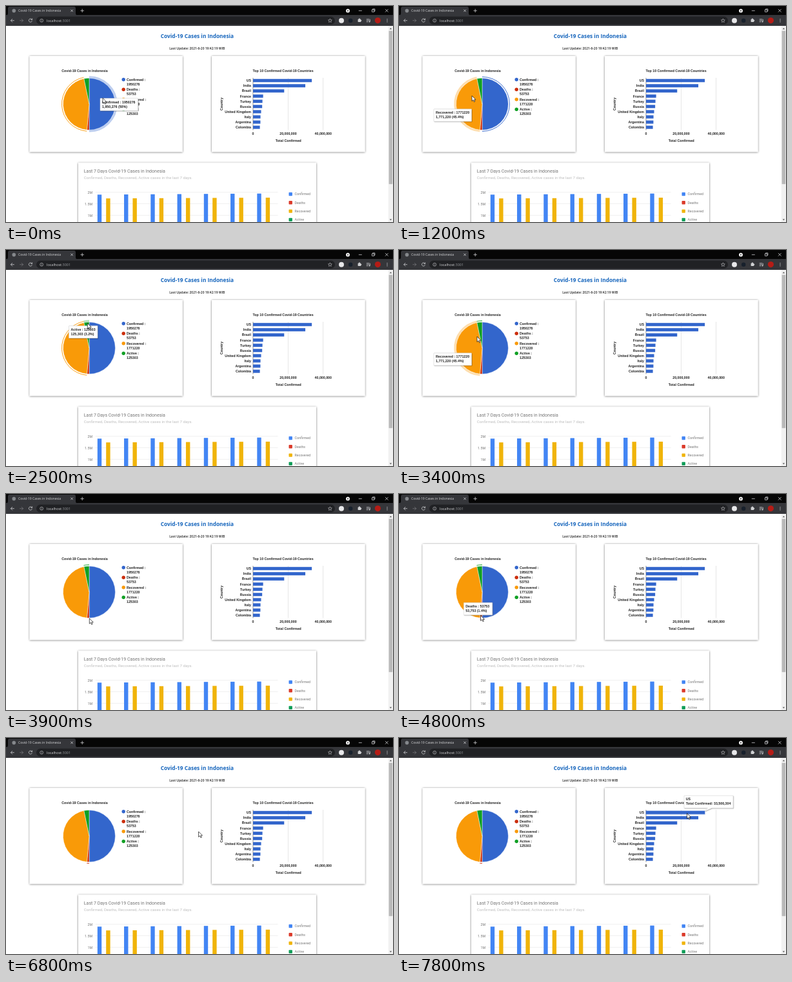
Write an HTML page that moves like this. It is 600 px wide and 337 px high and loops after 8 s.

```html
<!DOCTYPE html>
<html lang="en">
<head>
<meta charset="utf-8">
<title>Covid-19 Cases in Indonesia</title>
<style>
html, body { margin: 0; width: 100%; height: 100%; overflow: hidden; background: #fff; }
svg { display: block; width: 100%; height: 100%; }
text { white-space: pre; }
.chart { font: bold 5.27px "Liberation Sans", Arial, sans-serif; fill: #222; }
.mat { font: 5.27px Roboto, sans-serif; fill: #757575; }
.ui { font: 5.1px "Open Sans", sans-serif; fill: #d6d7d9; }
.end { text-anchor: end; }
.mid { text-anchor: middle; }
.line { fill: none; stroke: #d0d1d3; stroke-width: .8; }
</style>
</head>
<body>
<svg id="stage" viewBox="0 0 600 337">
  <defs>
    <filter id="lift" x="-10%" y="-10%" width="120%" height="120%">
      <feDropShadow dx="0" dy=".5" stdDeviation="1.5" flood-color="#000" flood-opacity=".6"/>
    </filter>
    <filter id="tipLift" x="-10%" y="-20%" width="120%" height="150%">
      <feDropShadow dx=".7" dy=".7" stdDeviation=".7" flood-color="#000" flood-opacity=".4"/>
    </filter>
  </defs>
  <rect width="600" height="337" fill="#fff"/>
  <g id="page"></g>
  <g id="browser"></g>
  <g id="rings"></g>
  <g id="tip"></g>
  <path id="cursor" d="M0 0V8.4L2 6.6L3.4 9.6L4.8 9L3.4 6.1H6Z" fill="#fff" stroke="#111" stroke-width=".7" stroke-linejoin="round"/>
</svg>
<script>
const $ = id => document.getElementById(id);
const LOOP = 8000, STEP = 100;
const PIE = { x: 129, y: 153, r: 40.5 };

const slices = [
  { name: 'Confirmed', n: 1950276, pct: '50%', color: '#3366cc', tip: [146, 144] },
  { name: 'Deaths', n: 53753, pct: '1.4%', color: '#cc2e0a', tip: [100.3, 169.5] },
  { name: 'Recovered', n: 1771220, pct: '45.4%', color: '#f99a08', tip: [54, 160.7] },
  { name: 'Active', n: 125303, pct: '3.2%', color: '#10a024', tip: [97.5, 118.2] }
];
const total = slices.reduce((sum, s) => sum + s.n, 0);
let turn = 0;
for (const s of slices) {
  s.from = turn;
  turn += s.n / total * 2 * Math.PI;
  s.to = turn;
}

const text = (x, y, str, cls = 'chart', extra = '') =>
  `<text x="${x}" y="${y}" class="${cls}" ${extra}>${str}</text>`;
const rect = (x, y, w, h, fill, extra = '') =>
  `<rect x="${x}" y="${y}" width="${w}" height="${h}" fill="${fill}" ${extra}/>`;
const dot = (x, y, r, fill, extra = '') =>
  `<circle cx="${x}" cy="${y}" r="${r}" fill="${fill}" ${extra}/>`;
const line = (d, extra = '') => `<path d="${d}" class="line" ${extra}/>`;
const card = (x, y, w, h) => rect(x, y, w, h, '#fff', 'filter="url(#lift)"');

const point = (a, r) =>
  `${(PIE.x + r * Math.sin(a)).toFixed(2)} ${(PIE.y - r * Math.cos(a)).toFixed(2)}`;
const arc = (s, r) =>
  `${point(s.from, r)}A${r} ${r} 0 ${s.to - s.from > Math.PI ? 1 : 0} 1 ${point(s.to, r)}`;
const ring = (s, r, width, alpha) =>
  `<path d="M${arc(s, r)}" fill="none" stroke="${s.color}" stroke-width="${width}" opacity="${alpha}"/>`;

function drawPie() {
  let out = card(36.7, 78, 237, 149.5) + text(86.3, 102.9, 'Covid-19 Cases in Indonesia');
  slices.forEach((s, i) => {
    const y = 116.6 + i * 15.5;
    out += `<path d="M${PIE.x} ${PIE.y}L${arc(s, PIE.r)}Z" fill="${s.color}" stroke="#fff" stroke-width=".45"/>`
      + dot(182.2, y - 1.8, 2.7, s.color)
      + text(187, y, s.name + ' :') + text(187, y + 7, s.n);
  });
  return out;
}

function drawCountries() {
  const rows = [['US', 33.5], ['India', 29.8], ['Brazil', 17.75], ['France', 5.75], ['Turkey', 5.36],
    ['Russia', 5.2], ['United Kingdom', 4.6], ['Italy', 4.25], ['Argentina', 4.2], ['Colombia', 3.9]];
  const perM = 2.72, x0 = 383;
  let out = card(319, 78, 237.5, 149.5) + text(382.5, 102.9, 'Top 10 Confirmed Covid-19 Countries');
  ['0', '20,000,000', '40,000,000'].forEach((label, i) => {
    const x = x0 + i * 20 * perM;
    out += rect(x - .25, 112, .5, 81.5, i ? '#ccc' : '#333') + text(x, 201.3, label, 'chart mid');
  });
  rows.forEach(([name, m], i) => {
    const y = 116.3 + i * 8.1;
    out += rect(x0, y - 2.5, m * perM, 5, '#3366cc') + text(380, y + 1.9, name, 'chart end');
  });
  return out + text(437.8, 212, 'Total Confirmed', 'chart mid', 'font-style="italic"')
    + text(0, 0, 'Country', 'chart mid', 'font-style="italic" transform="translate(335.6 153) rotate(-90)"');
}

function drawWeek() {
  let out = card(112, 244.7, 369, 110)
    + text(120.8, 260.2, 'Last 7 Days Covid-19 Cases in Indonesia', 'mat', 'style="font-size:7.03px"')
    + text(120.8, 269.6, 'Confirmed, Deaths, Recovered, Active cases in the last 7 days.', 'mat',
      'style="font-size:6.15px;fill:#bdbdbd"');
  ['2M', '1.5M', '1M'].forEach((label, i) => {
    const y = 290.6 + i * 18.1;
    out += rect(138.5, y - .25, 283, .5, '#e0e0e0') + text(134, y + 1.9, label, 'mat end');
  });
  for (let i = 0; i < 7; i++) {
    const x = 141.8 + i * 41.25;
    out += rect(x, 294.3 - i * .28, 6.4, 50, '#4285f4') + rect(x + 13.4, 300.2 - i * .2, 6.4, 50, '#f0b40a');
  }
  const colors = ['#4285f4', '#db3a2a', '#f0b40a', '#0f9d58'];
  slices.forEach((s, i) => {
    const y = 293.5 + i * 13.3;
    out += rect(438.5, y - 2.7, 5.4, 5.4, colors[i], 'rx=".8"') + text(447.6, y + 1.9, s.name, 'mat');
  });
  return out;
}

function drawBrowser() {
  const bar = '#35363a';
  let out = rect(0, 0, 600, 14.5, '#060606') + rect(0, 14, 600, 17, bar)
    + `<path d="M0 14.5Q3 14.5 3 11V3.5Q3 1 5.5 1H105.5Q108 1 108 3.5V11Q108 14.5 111 14.5Z" fill="${bar}"/>`
    + dot(12.3, 7.4, 2.8, '#85888c') + text(19, 9.2, 'Covid-19 Cases in Indonesia', 'ui')
    + line('M100.3 5.5l3.6 3.6m0-3.6l-3.6 3.6M115.5 7.3h5.4m-2.7-2.7v5.4')
    + dot(530, 7.4, 2.9, '#fff') + dot(530, 7.4, 1, '#222')
    + line('M546.8 7.3h5M567.4 5.8h3.4v3.4h-3.4zM568.5 5.8v-1.1h3.4v3.4h-1.1M588 4.9l4.6 4.6m0-4.6l-4.6 4.6')
    + line('M12.8 22.7H7.4m2.6-2.6l-2.6 2.6l2.6 2.6')
    + line('M21.2 22.7h5.4m-2.6-2.6l2.6 2.6l-2.6 2.6', 'opacity=".4"')
    + line('M40.1 21A2.6 2.6 0 1 0 40.4 23.4M40.6 19.4V21.6H38.4')
    + rect(47, 16.6, 463, 12.2, '#202124', 'rx="6.1"')
    + `<circle cx="55.2" cy="22.7" r="2.5" class="line" style="stroke-width:.6"/>`
    + line('M55.2 22.3v1.8M55.2 20.9v.6', 'style="stroke-width:.6"')
    + text(63, 24.6, 'localhost<tspan fill="#9a9da1">:3001</tspan>', 'ui', 'style="font-size:5.5px"')
    + line('M502.4 19.8l.9 1.9l2 .2l-1.5 1.4l.4 2.1l-1.8-1l-1.8 1l.4-2.1l-1.5-1.4l2-.2z', 'style="stroke-width:.6"')
    + dot(520, 22.7, 4, '#e8e8ea') + dot(534.2, 22.7, 3.2, '#17202c')
    + rect(545.6, 20.4, 4.6, 4.6, '#d0d1d3', 'rx=".6"') + dot(547.9, 20.3, 1, '#d0d1d3') + dot(550.3, 22.7, 1, '#d0d1d3')
    + line('M558.8 20.7h4.6m-4.6 2h4.6m-4.6 2h2.5M564.3 20.7v3.6') + dot(563.5, 24.6, 1, '#d0d1d3')
    + dot(576.4, 22.6, 4.6, '#b51c16');
  for (const y of [20.6, 22.7, 24.8]) out += dot(591, y, .65, '#d0d1d3');
  return out + rect(592.8, 31, 7.2, 306, '#f1f1f1') + rect(593.6, 38.8, 5.6, 239, '#b9b9b9')
    + '<path d="M594.6 36.2l1.8-2l1.8 2zM594.6 332.4l1.8 2l1.8-2z" fill="#555"/>';
}

$('page').innerHTML =
  text(296.4, 49.8, 'Covid-19 Cases in Indonesia', 'ui mid', 'style="font-size:8.3px;font-weight:700;fill:#1766bd"')
  + text(296.2, 67.8, 'Last Update: 2021-6-20 19:42:19 WIB', 'ui mid', 'style="font-size:4.97px;font-weight:600;fill:#222"')
  + drawPie() + drawCountries() + drawWeek();
$('browser').innerHTML = drawBrowser();

function sliceTip(s) {
  const [x, y] = s.tip;
  const w = s.n > 1e6 ? 58.5 : 44.5;
  return rect(x, y, w, 19.3, '#fff', 'rx=".5" stroke="#ccc" stroke-width=".5" filter="url(#tipLift)"')
    + text(x + 3, y + 7.5, `${s.name} : ${s.n}`)
    + text(x + 3, y + 14.5, `${s.n.toLocaleString('en-US')} (${s.pct})`);
}
const barTip = '<path d="M442 90H518V109.2H485L474.3 114L478.5 109.2H442Z" fill="#fff" stroke="#ccc" stroke-width=".5" filter="url(#tipLift)"/>'
  + text(444.8, 97.4, 'US') + text(444.8, 104.3, 'Total Confirmed: 33,500,304');
const barGlow = '<rect x="382.8" y="113.4" width="91.6" height="5.8" fill="none" stroke="#3366cc" stroke-width=".8" opacity=".35"/>';

// [time, value]: slice index, -1 for none, 4 for the US bar
const hovers = [[0, 0], [900, 2], [2200, 3], [3400, 2], [3800, -1], [4200, 2], [4300, 1], [5600, 0], [5900, -1], [7600, 4]];
const picks = [[0, 2], [400, 0], [1700, 2], [3100, 3], [5100, 1]];
// [time, x, y] of the pointer tip
const path = [[0, 150, 143.5], [100, 154, 143], [200, 157, 147], [500, 157, 147], [900, 125, 144],
  [1200, 113, 140], [1400, 112.5, 130], [1600, 112.5, 129.5], [2000, 120, 121], [2300, 126.3, 114.3],
  [3200, 126.3, 114.3], [3400, 121, 135], [3700, 125, 182], [3900, 129.3, 194], [4100, 128, 196],
  [4200, 124.5, 190], [4300, 127, 189], [4700, 127, 189], [4800, 126.6, 189.4], [5400, 126.6, 189.4],
  [5500, 128, 193], [5700, 155, 178], [5900, 174.6, 156.6], [6300, 208, 146], [7200, 371, 146],
  [7500, 430, 124], [7700, 446.5, 117.5], [LOOP, 446.5, 117.5]];

const at = (table, t) => table.filter(row => row[0] <= t).pop()[1];

function pointer(t) {
  const i = path.findIndex(p => p[0] > t);
  const [t0, x0, y0] = path[i - 1], [t1, x1, y1] = path[i];
  const k = (t - t0) / (t1 - t0);
  return [x0 + (x1 - x0) * k, y0 + (y1 - y0) * k];
}

let shown = '';
function render(now) {
  const t = Math.floor(now % LOOP / STEP) * STEP;
  const hover = at(hovers, t), pick = at(picks, t);
  const key = hover + '/' + pick;
  if (key !== shown) {
    shown = key;
    const s = slices[hover];
    const glowR = PIE.r + (hover === pick ? 3.7 : 1.75);
    $('rings').innerHTML = ring(slices[pick], PIE.r + 2, .9, 1)
      + (s ? ring(s, glowR, 3, .32) : hover === 4 ? barGlow : '');
    $('tip').innerHTML = s ? sliceTip(s) : hover === 4 ? barTip : '';
  }
  $('cursor').setAttribute('transform', `translate(${pointer(t)})`);
}

const start = performance.now();
function tick() {
  render(performance.now() - start);
  requestAnimationFrame(tick);
}
tick();
</script>
</body>
</html>
```
